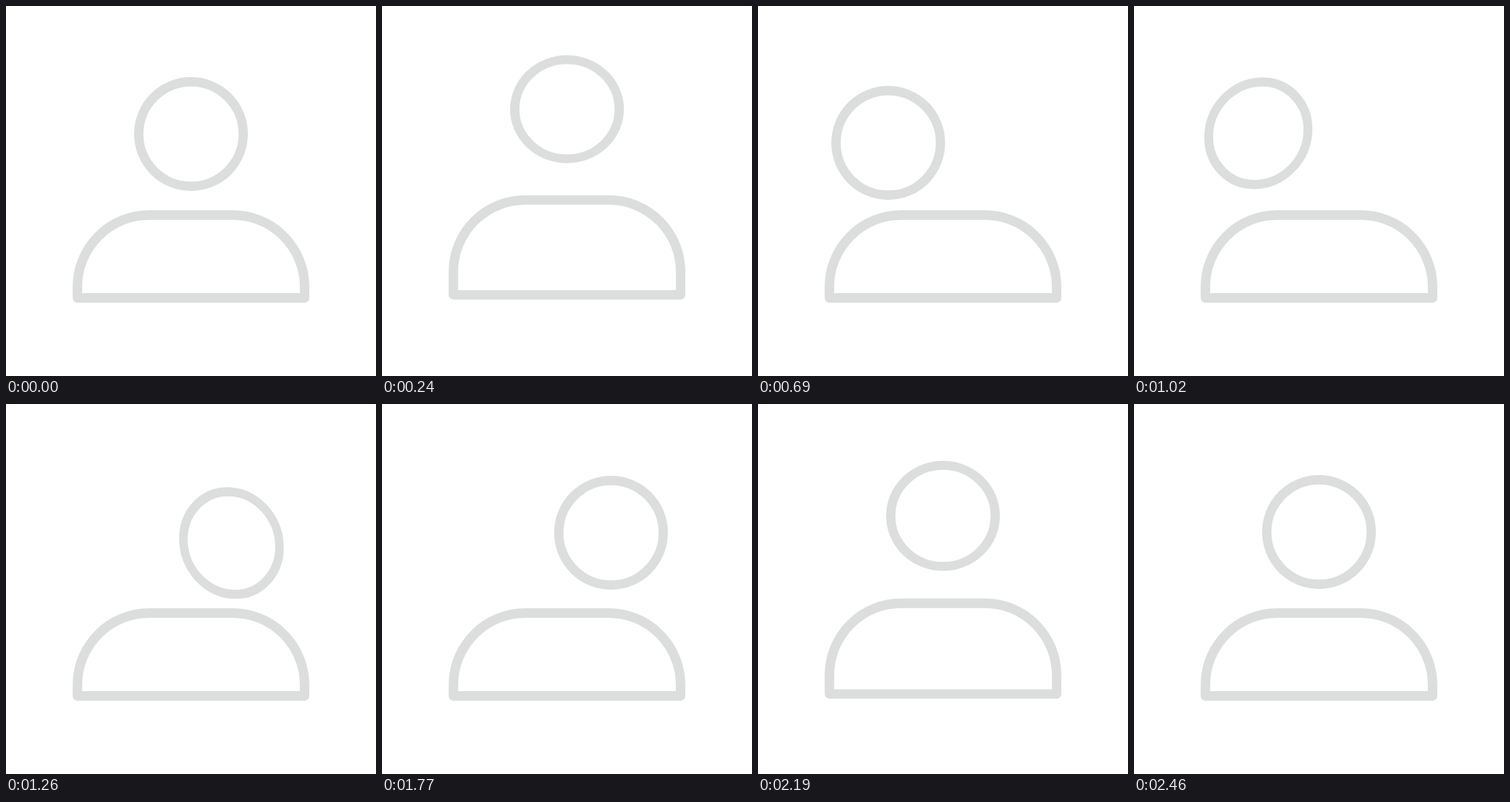
Recreate the animation shown at these times as an HTML page. Size 500x500 px, loop 2550 ms.

```html
<!DOCTYPE html>
<html lang="en">
<head>
<meta charset="utf-8">
<title>Avatar looking around</title>
<style>
  html, body { margin: 0; width: 100%; height: 100%; overflow: hidden; background: #fff; }
  svg { display: block; width: 100vw; height: 100vh; }
</style>
</head>
<body>
<svg viewBox="0 0 500 500" fill="none" stroke="#dcdedd" stroke-linejoin="round">
  <circle id="head" r="70.6" stroke-width="12.6"/>
  <path id="body" stroke-width="12.8"/>
</svg>
<script>
const LOOP = 2550, STEP = 30;
const HOME = { x: 250, y: 173 }, LEFT = { x: 176, y: 185 }, RIGHT = { x: 309.5, y: 174 };
const CORNER = 97;

const lerp = (a, b, u) => a + (b - a) * u;
const progress = (t, from, to) => Math.min(1, Math.max(0, (t - from) / (to - from)));
const bump = (t, from, to) => Math.sin(Math.PI * progress(t, from, to));
const smooth = u => u * u * (3 - 2 * u);

// Sideways travel: eased share of the way and speed in px/ms
function glide(t, from, to, distance) {
  const u = progress(t, from, to);
  return { share: smooth(u), speed: 6 * u * (1 - u) * distance / (to - from) };
}

// Hop up from home and drift down to the left; later hop from the right back home
function hop(t) {
  const returning = t >= 1560;
  const [a, b] = returning ? [RIGHT, HOME] : [HOME, LEFT];
  const [from, to] = returning ? [1770, 1995] : [420, 590];
  const { share, speed } = glide(t, from, to, b.x - a.x);
  const stretch = .22 * speed ** 2;
  return {
    x: lerp(a.x, b.x, share),
    y: lerp(a.y, b.y, share ** 2),
    sx: 1 + stretch, shear: .127 * speed, sy: 1 + stretch
  };
}

// Lean back, then swing low from left to right
function swing(t) {
  const p = progress(t, 930, 1350);
  const wave = Math.sin(2 * Math.PI * p), lean = Math.abs(wave);
  const windUp = 8 * bump(t, 930, 1110);
  return {
    x: lerp(LEFT.x, RIGHT.x, glide(t, 1020, 1291, 0).share) - windUp,
    y: lerp(LEFT.y, RIGHT.y, p) - 11.4 * wave + 18 * Math.sin(Math.PI * p) ** 8,
    sx: 1 - lean * lerp(.04, .095, p), shear: -.0375 * wave, sy: 1 - .02 * lean
  };
}

const head = document.getElementById('head');
const body = document.getElementById('body');

function render(t) {
  const lift = bump(t, 180, 480) + bump(t, 1770, 2250);
  const crouch = (bump(t, 0, 180) + bump(t, 1560, 1770) + bump(t, 2250, 2460)) ** 2;

  const pose = t >= 930 && t < 1560 ? swing(t) : hop(t);
  const y = pose.y - 57 * lift + 8 * crouch;
  const sx = pose.sx + .02 * crouch;
  const sy = pose.sy - .087 * lift - .05 * crouch;
  head.setAttribute('transform', `matrix(${sx} ${pose.shear} ${pose.shear} ${sy} ${pose.x} ${y})`);

  const top = 282.5 - 34.6 * lift + 8 * crouch;
  const base = 394.5 - 7.1 * lift;
  body.setAttribute('d', `M96.5 ${base}V${top + CORNER}a${CORNER} ${CORNER} 0 0 1 ${CORNER} ${-CORNER}`
    + `H${403.5 - CORNER}a${CORNER} ${CORNER} 0 0 1 ${CORNER} ${CORNER}V${base}Z`);
}

let start;
function tick(now) {
  start ??= now;
  render(Math.floor((now - start) % LOOP / STEP + .001) * STEP);
  requestAnimationFrame(tick);
}
render(0);
requestAnimationFrame(tick);
</script>
</body>
</html>
```
